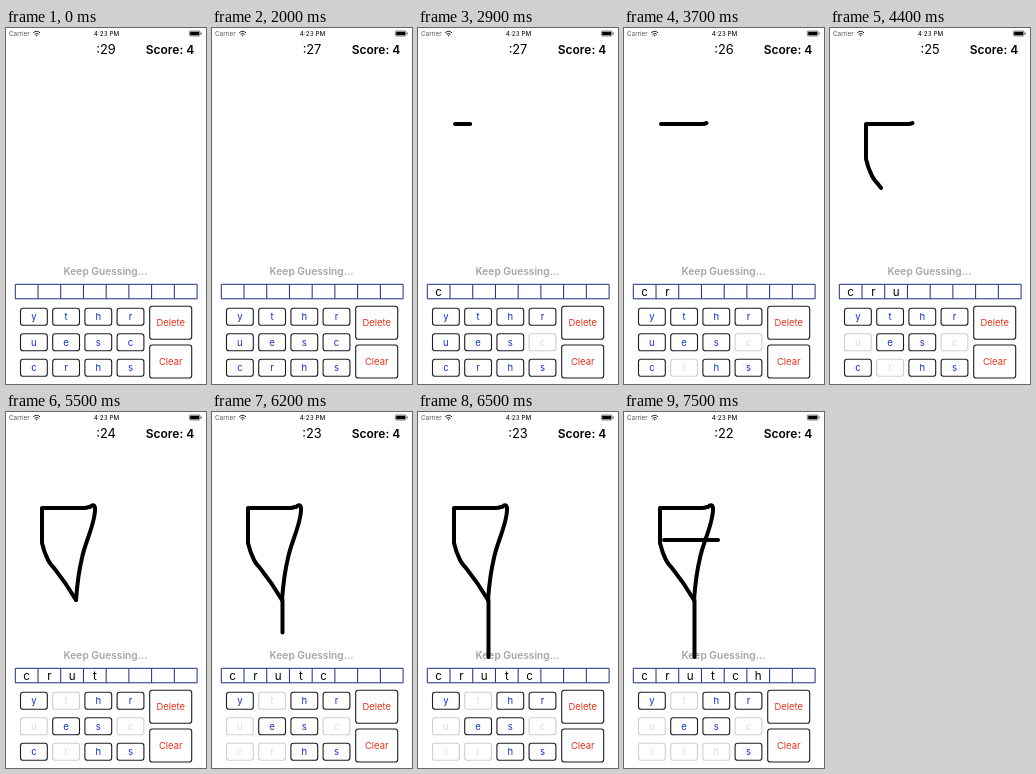
Write an HTML page that moves like this. It is 200x356 px and loops after 8 s.

```html
<!DOCTYPE html>
<html lang="en">
<head>
<meta charset="utf-8">
<title>Draw and guess</title>
<style>
  html, body { margin: 0; width: 100%; height: 100%; overflow: hidden; background: #fff; }
  svg { display: block; width: 100%; height: 100%; font-family: Inter, "Liberation Sans", sans-serif; }
  .mid { text-anchor: middle; }
  .box { fill: #fff; stroke: #1c1c24; stroke-width: 1.1; }
  .key text { fill: #0a32dc; font-size: 9.5px; }
  .key.used text { fill: #d9dbe6; }
  .key.used .box { stroke: #cfcfcf; }
  .action text { fill: #e8301c; font-size: 9.4px; }
  .slots { fill: none; stroke: #1c2f86; stroke-width: 1; }
  .ink { fill: none; stroke: #000; stroke-width: 4; stroke-linecap: round; stroke-linejoin: round; }
</style>
</head>
<body>
<svg id="stage" viewBox="0 0 200 356">
  <text x="3" y="8" font-size="6.3" fill="#555">Carrier</text>
  <g fill="none" stroke="#222" stroke-width="1">
    <path d="M27.2 4.8Q30.6 1.8 34 4.8M28.5 6.3Q30.6 4.5 32.7 6.3"/>
    <circle cx="30.6" cy="7.6" r=".4"/>
  </g>
  <text class="mid" x="100.5" y="8" font-size="6.3" font-weight="500" fill="#222">4:23 PM</text>
  <rect x="183.4" y="3" width="10.6" height="5" rx="1" fill="#fff" stroke="#333" stroke-width=".6"/>
  <rect x="184.2" y="3.8" width="9" height="3.4" rx=".5"/>
  <rect x="194.7" y="4.6" width=".8" height="1.8" rx=".4"/>
  <text id="clock" class="mid" x="100" y="26" font-size="12.8"></text>
  <text x="188.3" y="25.7" text-anchor="end" font-size="12" font-weight="600">Score: 4</text>
  <text class="mid" x="99.5" y="246.5" font-size="10.2" font-weight="600" fill="#a5a5a5">Keep Guessing...</text>
  <g id="board"></g>
  <g id="drawing"></g>
</svg>
<script>
const LOOP = 8000;
const byId = id => document.getElementById(id);

function add(parent, tag, attrs, text = '') {
  const el = document.createElementNS('http://www.w3.org/2000/svg', tag);
  for (const name in attrs) el.setAttribute(name, attrs[name]);
  el.textContent = text;
  parent.append(el);
  return el;
}

function button(kind, label, x, y, width, height) {
  const group = add(byId('board'), 'g', { class: kind });
  add(group, 'rect', { class: 'box', x, y, width, height, rx: 2.6 });
  add(group, 'text', { class: 'mid', x: x + width / 2, y: y + height / 2 + 3.2 }, label);
  return group;
}

const keys = [...'ythruesccrhs'].map((letter, i) =>
  button('key', letter, 14.5 + i % 4 * 32.2, 280.3 + Math.floor(i / 4) * 25.5, 26.8, 17));
button('action', 'Delete', 143.7, 278.3, 42, 33);
button('action', 'Clear', 143.7, 317, 42, 33);

const CELL = 22.72;
let slots = 'M9.3 256.3h181.8v14.5h-181.8z';
for (let i = 1; i < 8; i++) slots += `M${9.3 + i * CELL} 256.3v14.5`;
add(byId('board'), 'path', { class: 'slots', d: slots });

// Key index and time of each tap
const taps = [[7, 2300], [9, 3300], [4, 4300], [1, 5200], [8, 6200], [10, 7200]].map(([key, at], i) => ({
  key: keys[key],
  at,
  letter: add(byId('board'), 'text',
    { class: 'mid', x: 9.3 + (i + .5) * CELL, y: 267.8, 'font-size': 11.6 }, keys[key].textContent)
}));

const strokes = [
  [2600, 3500, 'M37 96H78Q81 96 82.5 95'],
  [3800, 4700, 'M36 96V131Q38 140 42 148Q44 152 48 156Q60 171 70 188'],
  [4700, 5400, 'M70 188Q72 162 76 146C79 130 90 110 89 96Q88 91 84 95'],
  [5800, 6500, 'M70.5 188V245'],
  [6800, 7500, 'M40 128H94']
].map(([start, end, d]) => ({
  start, end,
  path: add(byId('drawing'), 'path', { class: 'ink', d, pathLength: 1 })
}));

const ticks = [900, 2000, 3000, 4000, 5000, 6000, 7000];

function draw(now) {
  const t = Math.floor(now % LOOP / 100) * 100;
  byId('clock').textContent = ':' + (29 - ticks.filter(at => t >= at).length);
  for (const { key, at, letter } of taps) {
    key.classList.toggle('used', t >= at);
    letter.style.display = t >= at ? '' : 'none';
  }
  for (const { start, end, path } of strokes) {
    const part = Math.min(1, (t - start) / (end - start));
    path.style.display = part > 0 ? '' : 'none';
    path.style.strokeDasharray = part < 1 ? `${Math.max(0, part)} 2` : 'none';
  }
}

const began = performance.now();
function frame() {
  draw(performance.now() - began);
  requestAnimationFrame(frame);
}
frame();
</script>
</body>
</html>
```
